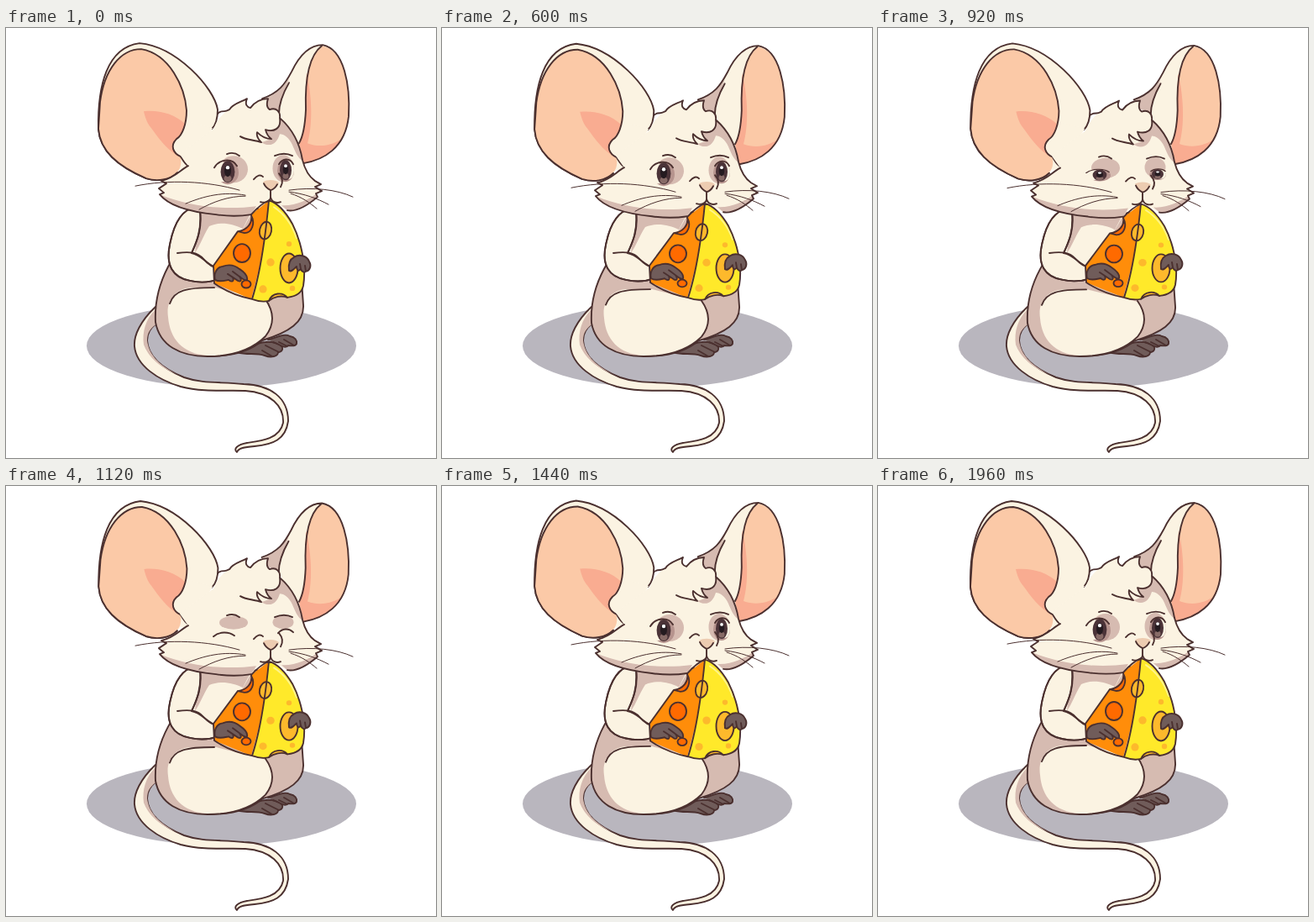
An HTML page for the animation above (2 s loop, 512 by 512 pixels).

```html
<!DOCTYPE html>
<html lang="en">
<head>
<meta charset="utf-8">
<title>Mouse with cheese</title>
<style>
html, body { margin: 0; width: 100%; height: 100%; overflow: hidden; background: #fff; }
svg { display: block; width: 100vw; height: 100vh; fill: none; stroke-linecap: round; stroke-linejoin: round; }
.ink { stroke: #4b302f; stroke-width: 1.9; }
.thin { stroke: #4b302f; stroke-width: 1; }
.cream { fill: #fbf3e2; }
.shade { fill: #d6bbb1; }
.peach { fill: #fbc9a7; }
.rose { fill: #f9ac91; }
.paw { fill: #705c5a; }
.yellow { fill: #ffe92a; }
.orange { fill: #ff8d0a; }
.deep { fill: #ff6a00; }
.gold { fill: #fdb92c; }
.iris { fill: #4b3338; }
</style>
</head>
<body>
<svg viewBox="0 0 512 512">
  <ellipse cx="256.5" cy="378.5" rx="160.5" ry="49.5" fill="#b9b6be"/>

  <!-- tail -->
  <path class="cream ink" d="M178 332C160 349 152 366 153 379C155 402 181 419 208 427C235 434 262 431 285 432C315 434 331 450 330 470C326 490 302 492 287 494C276 496 270 501 275 505C277 500 284 499 296 498C318 496 333 490 336 468C336 440 315 425 283 424C255 421 235 424 212 416C185 405 169 390 168 372C168 363 172 357 179 352"/>
  <path class="shade" d="M178 335C166 347 162 362 164 377C169 391 184 405 203 412C181 401 170 388 168 372C168 363 172 357 180 352Z"/>

  <!-- feet -->
  <path class="paw ink" d="M275 386C286 383 297 374 309 374C317 373 326 376 329 380C330 384 327 386 324 386C324 391 316 393 308 390C297 386 288 390 275 386ZM309 378L325 386M305 384L317 391"/>
  <path class="paw ink" d="M312 371C322 369 331 363 338 367C344 368 347 372 346 376C344 380 338 378 336 378C331 383 326 376 318 374M331 371L343 378M325 374L335 379"/>

  <g id="body">
    <path class="shade ink" d="M229 214L205 262L193 284C181 307 177 330 178 350C183 378 207 391 240 391C270 391 292 384 305 372C338 362 355 350 354 330L352 300L300 215Z"/>
    <path class="cream" d="M193 344C190 324 202 310 220 309H250L309 324C319 339 319 355 309 367C292 384 268 391 240 390C210 388 195 370 193 344Z"/>
    <path class="ink" d="M195 328C200 312 215 309 248 309M309 323C320 339 319 354 309 367C292 384 268 391 240 391"/>
  </g>

  <g id="arm">
    <path class="cream" d="M225 215L295 216L274 254L247 284L222 275Z"/>
    <path class="shade" d="M230 215H294L282 239C270 233 255 230 242 236C236 245 231 259 225 268Z"/>
    <path class="cream ink" d="M226 213C207 216 199 237 195 258C190 282 198 297 219 301C232 304 243 303 254 299L253 286C240 284 234 270 221 268C227 254 234 240 231 217Z" stroke="none"/>
    <path class="ink" d="M226 213C207 216 199 237 195 258C190 282 198 297 219 301C232 304 243 303 254 299M231 218C233 240 227 255 221 268M204 268C219 266 228 267 235 275C241 282 246 286 253 286"/>
  </g>

  <g class="head">
    <g id="earL">
      <path class="cream ink" d="M204 172C195 181 180 183 167 179C132 164 112 146 110 120C109 69 120 23 159 18C203 22 248 71 252 97C252 108 249 116 245 120"/>
      <path class="cream" d="M246 119L215 168L207 168L211 110Z"/>
      <path class="peach" d="M112 88C117 50 136 25 161 25C195 31 213 70 215 98C215 114 210 128 203 132C195 140 199 149 208 153C209 161 208 167 204 171C194 181 180 183 167 179C132 164 112 146 110 120Z"/>
      <path class="rose" d="M164 99C181 97 201 102 213 114C210 126 204 130 200 134C197 141 201 149 207 153C192 146 181 130 173 119C168 113 166 107 164 99Z"/>
      <path class="ink" d="M112 88C117 50 136 25 161 25C195 31 213 70 215 98C215 114 210 128 203 132C195 140 199 149 208 153C211 158 213 162 217 164M204 172C195 181 180 183 167 179C132 164 112 146 110 120L112 88"/>
    </g>
    <g id="earR">
      <path class="cream" d="M305 84C325 77 332 67 340 52C350 31 363 20 377 20C403 25 410 69 408 105C404 143 378 157 354 161L325 102Z"/>
      <path class="shade" d="M305 85C320 80 329 72 337 60C331 77 326 90 325 101L312 95Z"/>
      <path class="peach" d="M376 21C359 34 356 67 357 97C356 119 353 130 349 137L355 161C378 157 404 143 408 105C410 69 403 25 376 21Z"/>
      <path class="rose" d="M358 53C365 84 365 116 359 137C374 143 391 139 402 130C391 148 375 157 354 161L349 137C357 122 357 91 357 68Z"/>
      <path class="ink" d="M305 84C325 77 332 67 340 52C350 31 363 20 377 20C403 25 410 69 408 105C404 143 378 157 354 161M376 21C359 34 356 67 357 97C356 119 353 130 349 137M337 65C329 79 325 90 325 102"/>
    </g>

    <path class="cream" d="M247 120C252 108 260 99 266 97C270 90 280 88 287 84C284 91 287 94 291 95C297 87 305 84 312 84C310 90 311 95 314 97C322 94 327 100 326 107C342 121 350 139 353 157C356 169 361 177 368 182L375 186L368 189L376 194L369 197L371 201C358 212 345 219 335 217L315 206C305 208 299 212 292 222C279 224 264 224 250 222C220 219 194 212 183 198L188 196L182 191L191 185L185 182C202 178 207 169 217 164L207 150Z"/>
    <path class="shade" d="M326 107C340 120 351 139 353 158C347 154 344 146 341 139C337 130 331 126 326 126C323 136 317 141 308 138L304 136L316 132L309 121C320 123 328 118 326 107ZM183 198C217 212 259 217 298 212L292 222C279 224 264 224 250 222C220 219 194 212 183 198ZM328 211C345 212 360 204 370 197L371 201C358 212 345 219 335 217Z"/>
    <path class="ink" d="M252 102C254 99 258 99 260 99C262 99 264 98 266 97C270 90 280 88 287 84C284 91 287 94 291 95C297 87 305 84 312 84C310 90 311 95 314 97C322 94 327 100 326 107C342 121 350 139 353 157C356 169 361 177 368 182L375 186L368 189L376 194L369 197L371 201C358 212 345 219 335 217M217 164C207 169 202 178 185 182L191 185L182 191L188 196L183 198C194 212 220 219 250 222C264 224 279 224 292 222M279 129C285 133 295 133 304 136C300 132 298 128 299 124C304 129 310 132 316 132C312 129 310 125 309 121C319 124 328 120 326 107"/>

    <!-- eyes -->
    <g id="lids" class="shade">
      <ellipse cx="271" cy="168" rx="17" ry="16"/>
      <ellipse cx="330" cy="167" rx="12.5" ry="16"/>
    </g>
    <g id="eyes">
      <ellipse cx="264" cy="172" rx="13" ry="14" fill="#b6948e"/>
      <ellipse class="cream" cx="257" cy="171" rx="9" ry="12"/>
      <ellipse class="iris" cx="264" cy="171" rx="8.4" ry="13"/>
      <ellipse cx="264" cy="179" rx="4.5" ry="4" fill="#886b67"/>
      <ellipse cx="264" cy="170" rx="4" ry="7" fill="#251b20"/>
      <circle cx="264" cy="166" r="2.2" fill="#fff"/>
      <path class="ink" d="M248 166C254 156 269 154 275 164"/>
      <ellipse cx="333" cy="170" rx="10" ry="13" fill="#b6948e"/>
      <ellipse class="cream" cx="337" cy="169" rx="6" ry="11"/>
      <ellipse class="iris" cx="333" cy="169" rx="7" ry="12"/>
      <ellipse cx="333" cy="176" rx="3.5" ry="3.5" fill="#886b67"/>
      <ellipse cx="333" cy="168" rx="3.2" ry="6" fill="#251b20"/>
      <circle cx="333" cy="164" r="1.9" fill="#fff"/>
      <path class="ink" d="M325 162C329 155 338 154 342 162"/>
    </g>
    <path id="shut" class="ink" d="M247 177C254 171 265 171 272 176M324 173C329 167 337 167 342 172"/>
    <path id="brows" class="ink" d="M263 150C268 148 274 149 278 152M320 152C327 149 335 149 341 152"/>

    <path d="M306 183C311 180 321 180 325 184C323 189 319 192 315 193C311 191 308 188 306 183Z" fill="#edccb1"/>
    <path class="ink" d="M295 180C299 175 303 174 306 177M307 185C309 190 313 192 315 193C319 192 321 190 323 186M325 173C330 179 330 184 327 189"/>
  </g>

  <g id="cheese">
    <path class="orange" d="M313 205L292 222C294 232 287 241 276 242L247 283L248 304L292 323L308 260Z"/>
    <path class="yellow" d="M313 205C309 248 304 288 293 323C301 326 309 326 313 325C317 315 329 314 335 321C344 320 352 317 354 307C358 282 351 253 341 233C332 217 323 208 313 205Z"/>
    <path class="gold ink" d="M313 325C317 315 329 314 335 321C328 318 319 320 313 325Z"/>
    <path d="M319 213C331 221 341 235 346 250" stroke="#fff58a" stroke-width="2"/>
    <path class="deep" d="M292 223C297 232 293 244 284 244L276 242C287 239 292 232 292 223Z"/>
    <g class="gold">
      <circle cx="315" cy="279" r="4.7"/><circle cx="337" cy="257" r="3.2"/>
      <circle cx="306" cy="311" r="4.6"/><circle cx="341" cy="310" r="3.2"/>
    </g>
    <ellipse class="gold ink" cx="309" cy="241" rx="7" ry="10.5" transform="rotate(12 309 241)"/>
    <ellipse class="gold ink" cx="337" cy="286" rx="10.5" ry="17.5"/>
    <ellipse class="deep ink" cx="281" cy="268" rx="10" ry="11"/>
    <ellipse class="deep ink" cx="286" cy="305" rx="5.5" ry="4.6"/>
    <path class="ink" d="M313 205C304 209 298 215 292 222C294 232 287 241 276 242L247 283L248 304C262 314 278 320 293 323C301 326 309 326 313 325M335 321C344 320 352 317 354 307C358 282 351 253 341 233C332 217 323 208 313 205C309 248 304 288 293 323M292 223C297 232 293 244 284 244L276 242"/>
  </g>

  <g id="paws" class="paw ink">
    <path d="M249 300C247 292 251 285 258 284C266 281 273 283 278 287C284 291 288 296 287 300C284 302 281 298 278 296C281 300 280 303 276 301L270 297C272 302 269 303 265 300C260 301 254 303 249 300ZM270 290L278 296M264 293L270 297"/>
    <path d="M337 289C336 282 337 276 343 273C349 269 358 271 361 278C364 283 362 289 357 290C355 292 352 290 351 287C348 291 346 288 346 284C343 287 340 291 337 289ZM351 287L350 281M357 290L356 283"/>
  </g>

  <g class="head">
    <path class="ink" d="M315 194V201C315 206 309 209 303 207M315 201C316 207 322 209 327 207"/>
    <path class="thin" d="M278 193C240 182 193 180 154 188M285 199C260 194 235 200 214 209M285 200C265 200 246 207 230 216M337 193C365 189 394 192 413 201M337 195C355 197 371 203 384 210M339 197C352 201 362 208 370 215"/>
  </g>
</svg>
<script>
const LOOP = 2000, STEP = 40;
const el = id => document.getElementById(id);
const heads = document.querySelectorAll('.head');
const put = (node, value) => node.setAttribute('transform', value);
const squash = (id, y, s) => put(el(id), `translate(0 ${y * (1 - s)}) scale(1 ${s})`);
const clamp = x => Math.min(1, Math.max(0, x));
const smooth = x => x * x * (3 - 2 * x);
// Swell from 0 to 1 and back once per loop
const wave = (t, peak) => (1 + Math.cos((t - peak) / LOOP * 2 * Math.PI)) / 2;

function draw(t) {
  const breath = wave(t, 850), sway = wave(t, 1020);
  const open = 1 - smooth(clamp((t - 780) / 280)) + smooth(clamp((t - 1140) / 260));
  heads.forEach(h => put(h, `translate(0 ${2.6 * breath})`));
  put(el('earL'), `translate(0 ${-1.8 * sway}) rotate(${0.5 * sway} 215 150)`);
  put(el('earR'), `translate(0 ${-1.5 * sway}) rotate(${-0.4 * sway} 345 140)`);
  squash('body', 391, 1 - 0.03 * breath);
  squash('arm', 268, 1 - 0.04 * breath);
  squash('cheese', 285, 1 - 0.057 * breath);
  put(el('paws'), `translate(0 ${-2 * breath})`);

  squash('eyes', 174, Math.max(open, 0.01));
  squash('lids', 153, 0.5 + 0.5 * open);
  put(el('brows'), `translate(0 ${2 * (1 - open)})`);
  el('eyes').style.display = open > 0.08 ? '' : 'none';
  el('shut').style.display = open > 0.08 ? 'none' : '';
}

const start = performance.now();
function tick() {
  const t = (performance.now() - start) % LOOP;
  draw(Math.floor(t / STEP) * STEP);
  requestAnimationFrame(tick);
}
tick();
</script>
</body>
</html>
```
